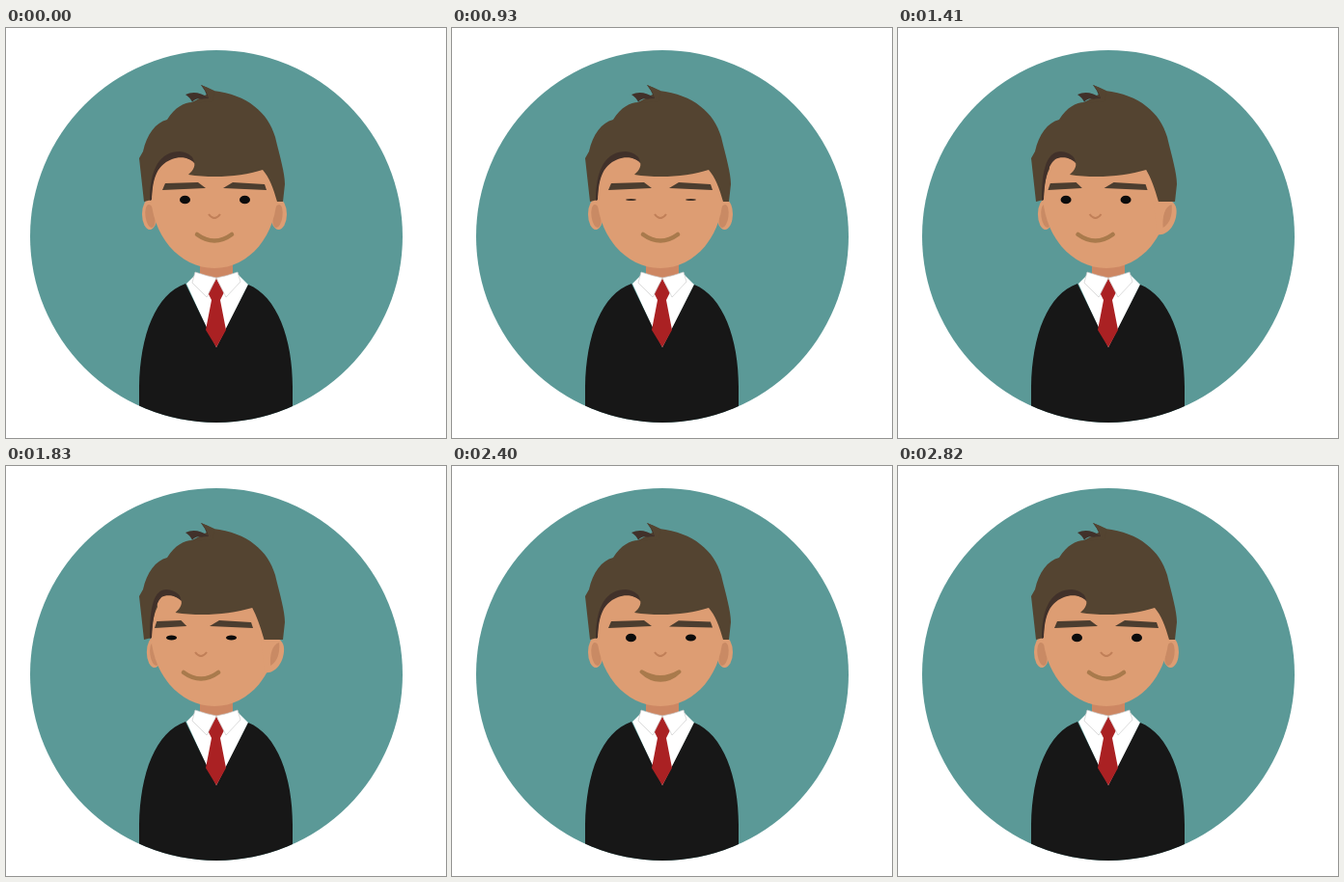
Write an HTML page that moves like this. It is 456 px wide and 425 px high and loops after 3000 ms.

```html
<!DOCTYPE html>
<html lang="en">
<head>
<meta charset="utf-8">
<title>Blinking businessman</title>
<style>
  html, body { margin: 0; width: 100%; height: 100%; overflow: hidden; background: #fff; }
  svg { display: block; }
</style>
</head>
<body>
<svg width="456" height="425" viewBox="0 0 456 425">
  <clipPath id="disc"><circle cx="218" cy="216" r="193"/></clipPath>
  <circle cx="218" cy="216" r="193" fill="#5b9997"/>

  <g clip-path="url(#disc)">
    <path fill="#cd8763" d="M201 238H235V262H201Z"/>
    <path fill="#fff" d="M187 265L196 256L218 262L241 256L251 266L218 333Z"/>
    <path fill="#171717" d="M138 410V372C139 318 155 276 186 265L218 331L251 266C281 278 297 322 297 372V410Z"/>
    <path fill="#aa2123" d="M218 260L226 274L222 282L228 313L218 331L207 313L213 282L209 274Z"/>
    <path fill="#fff" stroke="#ccc" stroke-width=".7" d="M196 253Q208 257 218 259L208 279L193 264ZM240 253Q229 257 218 259L228 279L243 263Z"/>
  </g>

  <g id="earL">
    <ellipse cx="149" cy="193" rx="8" ry="16" fill="#dd9d73"/>
    <ellipse cx="149.5" cy="195" rx="5" ry="12" fill="#c98a64" transform="rotate(-8 149.5 195)"/>
  </g>
  <g id="earR">
    <ellipse cx="282.5" cy="193" rx="8.5" ry="16" fill="#dd9d73"/>
    <ellipse cx="281.5" cy="195" rx="5" ry="12" fill="#c98a64" transform="rotate(8 281.5 195)"/>
  </g>
  <path fill="#dd9d73" d="M150 130V170C150 215 180 249 216 249S281 215 281 170V130Z"/>
  <g id="earTurned">
    <path fill="#dd9d73" d="M264 180C278 174 288 179 288 190C288 203 279 216 268 214Z"/>
    <path fill="#c98a64" d="M283 183C276 185 273 195 274 207C281 203 284 194 283 183Z"/>
  </g>

  <path id="hair" fill="#544431"/>
  <path id="shade" fill="#41312a"/>
  <path fill="#41312a" d="M186 69Q197 64 209 72Q207 65 202 59Q210 62 215 66L208 76Q198 70 193 77Q191 72 186 69Z"/>
  <path fill="#544431" d="M202 59Q210 62 216 65L214 76L192 78Q200 73 210 73Q208 65 202 59Z"/>

  <g id="face">
    <path id="browL" fill="#4b3d2f" d="M162 168L165 161L199 160L207 166Z"/>
    <path id="browR" fill="#4b3d2f" d="M225 166L235 160L268 162L270 168Z"/>
    <ellipse id="eyeL" cx="185.5" cy="178" rx="5.5" fill="#0c0c0c"/>
    <ellipse id="eyeR" cx="247.5" cy="178" rx="5.5" fill="#0c0c0c"/>
    <path id="wink" fill="none" stroke="#7b4e2e" stroke-width="2" d="M242 180Q248 189 254 180"/>
    <path fill="none" stroke="#c07f58" stroke-width="2" d="M210 193Q216 201 222 193"/>
    <path id="mouth" stroke="#a97a4c" stroke-linecap="round" stroke-linejoin="round"/>
  </g>
  <path id="star" fill="#fff" d="M0 -27L2.5 -2.5L22 0L2.5 2.5L0 27L-2.5 2.5L-22 0L-2.5 -2.5Z"/>
</svg>
<script>
const LOOP = 3000;
const $ = id => document.getElementById(id);
const set = (id, name, value) => $(id).setAttribute(name, value);
const show = (id, on) => set(id, 'visibility', on ? 'visible' : 'hidden');
const mix = (a, b, k) => a + (b - a) * k;
const ramp = (t, from, to) => Math.min(1, Math.max(0, (t - from) / (to - from)));
const ease = p => p * p * (3 - 2 * p);
const pulse = (t, a, b, c, d) => ease(ramp(t, a, b)) - ease(ramp(t, c, d));

const BLINKS = [600, 870, 1200, 1800];

function eyeOpen(t) {
  const start = BLINKS.find(s => t >= s && t < s + 210);
  if (start === undefined) return 1;
  return Math.max(.12, 1 - ramp(t, start, start + 75) + ramp(t, start + 75, start + 210));
}

function drawHair(turn) {
  const d = -14 * turn;
  set('hair', 'd', `M143 180L138 135L142 128C146 110 155 98 167 95C175 82 185 77 193 77
    L215 65C250 69 272 88 279 113C284 134 289 150 289 162L287 180L${281 + d} 180
    C${277 + d} 166 ${273 + d} 155 ${266 + d * .8} 147C${245 + d} 154 ${215 + d} 156 ${189 + d} 152
    C${195 + d} 147 ${197 + d} 141 ${194 + d} 138C${181 + d} 129 ${160 + d * .4} 133 157 146
    C152 156 151 168 151 178Z`);
  set('shade', 'd', `M149 179C149 145 ${160 + d * .5} 128 ${180 + d} 128
    C${190 + d} 129 ${195 + d} 134 ${195 + d} 140C${190 + d} 134 ${180 + d} 133 ${172 + d * .8} 136
    C154 143 152 160 151 178Z`);
}

function drawMouth(smile) {
  const w = mix(18, 31, smile), l = 216 - w, r = 216 + w, y = mix(214, 208, smile);
  const bend = w * mix(1 / 3, .93, smile), low = y + mix(8.7, 32, smile);
  set('mouth', 'd', `M${l} ${y}Q216 ${y + 13 * (1 - smile)} ${r} ${y}C${216 + bend} ${low} ${216 - bend} ${low} ${l} ${y}Z`);
  set('mouth', 'fill', smile > 0 ? '#fff' : 'none');
  set('mouth', 'stroke-width', 4.5 * (1 - smile));
}

function draw(t) {
  const turn = pulse(t, 1200, 1500, 1800, 2070);
  const smile = pulse(t, 2370, 2520, 2670, 2820);
  const open = eyeOpen(t);
  const glint = Math.sin(Math.PI * ramp(t, 2445, 2685));

  drawHair(turn);
  drawMouth(smile);
  set('face', 'transform', `translate(${-14.5 * turn} 0)`);
  set('browL', 'transform', `translate(185 0) scale(${1 - .27 * turn} 1) translate(-185 0)`);
  set('browR', 'transform', `rotate(${-14 * smile} 248 165)`);
  set('eyeL', 'ry', 4.3 * open);
  set('eyeR', 'ry', 4.3 * open * Math.max(0, 1 - 1.6 * smile));
  show('wink', smile > .6);

  set('earL', 'transform', `translate(${5 * turn} 0)`);
  set('earR', 'transform', `translate(${-3 * turn} 0)`);
  show('earR', turn < .5);
  show('earTurned', turn >= .5);
  set('earTurned', 'transform', `translate(${3 * (1 - turn)} 0)`);

  set('star', 'transform', `translate(191 212) rotate(${30 + (t - 2550) * .25}) scale(${glint})`);
}

function tick(now) {
  draw(now % LOOP);
  requestAnimationFrame(tick);
}
draw(0);
requestAnimationFrame(tick);
</script>
</body>
</html>
```
